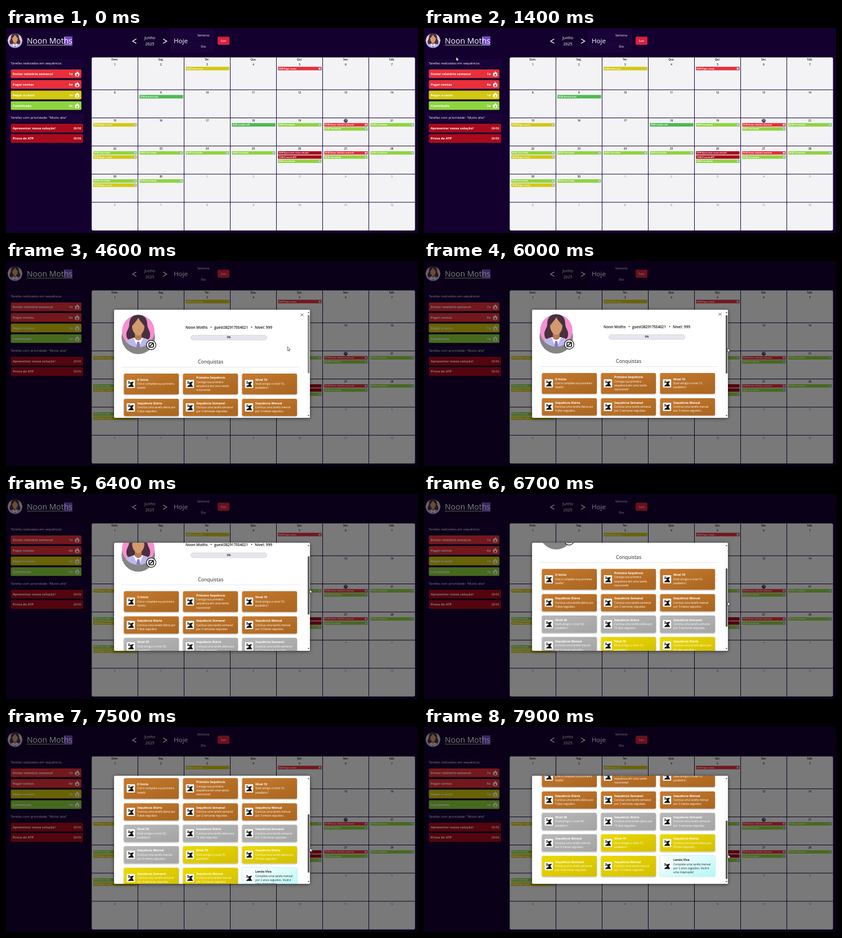
Write an HTML page that moves like this. It is 732 px wide and 366 px high and loops after 8000 ms.

```html
<!DOCTYPE html>
<html lang="pt">
<head>
<meta charset="utf-8">
<title>Calendário de tarefas</title>
<style>
html, body { margin: 0; width: 100%; height: 100%; overflow: hidden; background: #14002f; }
svg {
  display: block; width: 732px; height: 366px; font-family: "Open Sans", "Noto Sans", sans-serif;
  --bg: #14002f; --panel: #190338; --cell: #f3f3f6; --line: #17053a; --ink: #111; --pale: #8b8b93;
  --white: #fff; --red: #e8303a; --dark: #a90b1c; --yellow: #d2c811; --green: #8fd43f; --leaf: #4cbb50;
  --exit: #d8203f; --icon: #9db8e4; --mark: #7446c8;
}
</style>
</head>
<body>
<svg id="stage" viewBox="0 0 732 366">
  <defs>
    <linearGradient id="bronze" x2="1" y2="1"><stop stop-color="#c67a30"/><stop offset="1" stop-color="#a9651f"/></linearGradient>
    <linearGradient id="silver" x2="1" y2="1"><stop stop-color="#b8b8b8"/><stop offset="1" stop-color="#a4a4a4"/></linearGradient>
    <linearGradient id="gold" x2="1" y2="1"><stop stop-color="#ecd900"/><stop offset="1" stop-color="#d3bf00"/></linearGradient>
    <linearGradient id="legend" x2="1" y2="1"><stop stop-color="#fff"/><stop offset="1" stop-color="#b5f6f6"/></linearGradient>
    <filter id="soft" x="-10%" y="-20%" width="120%" height="150%"><feDropShadow dx="0" dy="1" stdDeviation="1" flood-opacity=".35"/></filter>
    <filter id="deep" x="-10%" y="-10%" width="120%" height="120%"><feDropShadow dx="0" dy="1" stdDeviation="3" flood-opacity=".6"/></filter>
    <filter id="glow" x="-10%" y="-20%" width="120%" height="150%"><feDropShadow dx="0" dy="0" stdDeviation="1.6" flood-color="#5ee0e0" flood-opacity=".8"/></filter>
    <clipPath id="window"><rect x="192" y="87" width="348" height="193" rx="2.500"/></clipPath>
    <clipPath id="round"><circle r="29"/></clipPath>
  </defs>
  <g id="page"></g>
  <g id="modal">
    <rect width="732" height="366" opacity=".5"/>
    <rect x="192" y="87" width="348" height="193" rx="2.500" fill="#fff" filter="url(#deep)"/>
    <g clip-path="url(#window)">
      <g id="content"></g>
      <rect x="535" y="87" width="5" height="193" fill="#fafafa"/>
      <path d="M535.800 93l1.700-2.200 1.700 2.200zM535.800 275l1.700 2.200 1.700-2.200z" fill="#555"/>
      <rect id="thumb" x="536" width="3.200" height="104.500" rx="1.600"/>
    </g>
  </g>
  <path id="cursor" d="M0 0v7l1.600-1.400 1.100 2.400 1.100-.5-1.100-2.300h2.300z" fill="#fff" stroke="#111" stroke-width=".6"/>
</svg>
<script>
const $ = id => document.getElementById(id);
const ink = c => c !== 'none' && /^[a-z]+$/.test(c) ? `var(--${c})` : c;

const rect = (x, y, w, h, fill, r = 0, extra = '') =>
  `<rect x="${x}" y="${y}" width="${w}" height="${h}" rx="${r}" fill="${ink(fill)}" ${extra}/>`;
const circle = (x, y, r, fill, extra = '') =>
  `<circle cx="${x}" cy="${y}" r="${r}" fill="${ink(fill)}" ${extra}/>`;
const path = (d, fill, extra = '') => `<path d="${d}" fill="${ink(fill)}" ${extra}/>`;
const stroke = (d, color, width) => path(d, 'none', `stroke="${ink(color)}" stroke-width="${width}"`);
// y is the middle of the line
const text = (x, y, s, size, fill = 'white', weight = 400, anchor = 'start') =>
  `<text x="${x}" y="${y + size * .36}" font-size="${size}" font-weight="${weight}" text-anchor="${anchor}" fill="${ink(fill)}">${s}</text>`;
const mid = (x, y, s, size, fill, weight) => text(x, y, s, size, fill, weight, 'middle');

const BRAND = 'Noon Moths', USER = 'guest382917554021';

// Portrait in a circle of radius 29
function portrait(x, y, scale, backdrop) {
  return `<g transform="translate(${x} ${y}) scale(${scale})" clip-path="url(#round)">` +
    circle(0, 0, 29, backdrop) +
    path('M0-29C11-29 16-22 16-12 16-4 22 0 21 8 21 14 16 17 11 17H-11C-16 17-21 14-21 8-22 0-16-4-16-12-16-22-11-29 0-29z', '#48303f') +
    path('M-27 31C-27 19-20 15-8 12H8C20 15 27 19 27 31z', '#bdb6ea') +
    path('M-9 12L0 31 9 12z', '#fff') +
    path('M-2 19h4l1.500 12h-7z', '#7d79c4') +
    path('M-6 2H6V13C3 18-3 18-6 13z', '#b87a50') +
    path('M-11-9C-11-19-7-23 0-23S11-19 11-9C11 1 5 8 0 8S-11 1-11-9z', '#d39a70') +
    path('M0-24C-3-17-8-14-12-7L-13-17C-10-27 10-27 13-17L12-7C8-14 3-17 0-24z', '#48303f') + '</g>';
}

function header() {
  return portrait(16, 22.5, .45, '#d9c3da') +
    rect(103, 15, 15, 15, 'mark') +
    text(37, 22.5, BRAND, 14) +
    rect(37, 30, 81, .7, 'white') +
    rect(291, 2, 40, 42, 'panel') + rect(331, 2, 39, 20.5, 'panel') + rect(331, 23.5, 39, 20.5, 'panel') +
    stroke('M231.500 19.500l-6.500 4 6.500 4M279 19.500l6.500 4-6.500 4', 'white', 1.4) +
    mid(255.5, 17, 'Junho', 7) + mid(255.5, 28.5, '2025', 7) +
    mid(310.5, 23, 'Hoje', 11.6) + mid(350.5, 12.5, 'Semana', 5.6) + mid(350.5, 33, 'Dia', 5.6) +
    rect(376, 15.5, 21, 14.5, 'exit', 2) + mid(386.5, 22.7, 'Sair', 6);
}

function flame(x, y, hole) {
  return `<g transform="translate(${x} ${y})">` +
    path('M-.5-4.800C2.500-2.500 4-.8 4 1.300A4 3.500 0 0 1-4 1.300C-4-.5-3-1.200-2.500-2.600-1.800-2-1.300-1.800-1-1.600-.5-2.500-.4-3.500-.5-4.800z', 'white') +
    path('M.2-.5C1.300.5 1.800 1.200 1.800 2.200A1.800 1.700 0 0 1-1.800 2.200C-1.800 1-.3.8.2-.5z', hole) + '</g>';
}

function sidebar() {
  const streaks = [['Enviar relatório semanal', 1, 'red'], ['Pagar contas', 6, 'red'],
    ['Regar o cacto', 1, 'yellow'], ['Caminhada', 3, 'green']];
  const urgent = ['Apresentar nossa solução!', 'Prova de ATP'];
  return rect(5, 55.5, 134, 14.5, 'panel') + rect(5, 152.5, 134, 14.5, 'panel') +
    text(8.5, 62.5, 'Tarefas realizadas em sequência:', 5.95) +
    text(8.5, 160, 'Tarefas com prioridade: "Muito alta"', 5.95) +
    streaks.map(([name, n, color], i) => {
      const y = 81.8 + i * 18.9;
      return rect(8.5, y - 7.8, 125.5, 15.6, color, 2) + text(12, y, name, 5.8, 'white', 700) +
        text(118.5, y, n + 'x', 5.8, 'white', 700, 'end') + flame(126.5, y, color);
    }).join('') +
    urgent.map((name, i) => {
      const y = 178.7 + i * 18.6;
      return rect(8.5, y - 7.8, 128.5, 15.6, 'dark', 2) + text(12, y, name, 5.8, 'white', 700) +
        text(133.5, y, '26/06', 5.2, 'white', 600, 'end');
    }).join('');
}

const walk = ['green', '08:00 Caminhada', 1];
const water = ['yellow', '10:00 Regar o cacto', 1];
const report = ['red', '09:00 Enviar relatório semanal', 1];
const events = {
  3: [['yellow', '03:00 Comer ovos']], 5: [['red', '00:00 Pagar contas', 1]],
  9: [['leaf', '10:00 dentista hoje!']], 15: [water], 18: [['leaf', '10:00 reunião café']],
  19: [walk], 20: [report, walk], 21: [walk], 22: [walk, water], 23: [walk], 24: [walk], 25: [walk],
  26: [['dark', '02:00 Apresentar nossa solução!'], ['dark', '19:00 Prova de ATP'], walk],
  27: [report, walk], 28: [walk], 29: [walk, water], 30: [walk]
};

function calendar() {
  const x0 = 152.3, cw = 82.05, rh = 50.2;
  let out = rect(x0, 52.5, 574.4, 309, 'cell', 2.5);
  for (let c = 1; c < 7; c++) out += rect(x0 + c * cw - .5, 52.5, 1, 309, 'line');
  for (let r = 0; r < 5; r++) out += rect(x0, 109.8 + r * rh, 574.4, 1, 'line');
  ['Dom.', 'Seg.', 'Ter.', 'Qua.', 'Qui.', 'Sex.', 'Sáb.'].forEach((d, c) =>
    out += mid(x0 + (c + .5) * cw, 56.3, d, 4.7, 'ink', 600));
  for (let i = 0; i < 42; i++) {
    const day = i + 1, x = x0 + (i % 7) * cw, cx = x + cw / 2, y = 65 + Math.floor(i / 7) * rh;
    if (day === 20) out += circle(cx, y + .2, 3.3, 'line');
    out += mid(cx, y, day > 30 ? day - 30 : day, 4.6, day > 30 ? 'pale' : day === 20 ? 'white' : 'ink', 600);
    (events[day] || []).forEach(([color, label, repeats], k) => {
      const ey = y + 7.4 + k * 7.4;
      out += rect(x + 2.7, ey - 3.1, 77.5, 6.2, color, .8) + text(x + 4, ey, label, 3.4, 'white', 700);
      if (repeats) out += rect(x + 74.8, ey - 2, 4, 4, 'icon', .6) + rect(x + 76, ey - .8, 1.6, 1.6, 'white');
    });
  }
  return out;
}

function profile() {
  const edit = circle(258, 150, 8.4, '#fff', 'stroke="#111" stroke-width="1.200"') +
    rect(254, 146, 8, 8, 'none', 1.5, 'stroke="#111" stroke-width="1.700"') +
    stroke('M255.500 152.500l6-6', 'ink', 1.7);
  return circle(235, 136.5, 29.7, '#858585') + portrait(235, 125, 1, '#f78fd0') + edit +
    stroke('M523.500 93.500l5 5M528.500 93.500l-5 5', '#444', .8) +
    text(319, 118.3, BRAND, 6.6, 'ink', 600) + mid(364.5, 118.3, '•', 6.6, 'ink', 600) +
    text(370, 118.3, USER, 6.3, 'ink', 600) + mid(436.5, 118.3, '•', 6.6, 'ink', 600) +
    text(442, 118.3, 'Nível: 999', 6.6, 'ink', 600) +
    rect(328.5, 132.5, 135, 8.6, '#e6e6ee', 4.3, 'stroke="#c6c6ce" stroke-width=".6"') +
    mid(396, 136.6, '0%', 4.8, 'ink', 600) +
    mid(363.5, 180, 'Conquistas', 8.7, '#222') +
    rect(205, 189.2, 317, .7, '#dcdcdc');
}

const level = n => ['Nível ' + n, `Você atingiu o nível ${n},|parabéns!`];
const daily = n => ['Sequência Diária', `Conclua uma tarefa diária por|${n} dias seguidos.`];
const weekly = n => ['Sequência Semanal', `Conclua uma tarefa semanal|por ${n} semanas seguidas.`];
const monthly = n => ['Sequência Mensal', `Conclua uma tarefa mensal|por ${n} meses seguidos.`];
const awards = [
  ['O Início', 'Crie e complete sua primeira|tarefa!'],
  ['Primeira Sequência', 'Consiga sua primeira|sequência em uma tarefa|recorrente!'],
  level(10), daily(5), weekly(2), monthly(3),
  level(30), daily(15), weekly(3), monthly(6),
  level(70), daily(30), weekly(4), monthly(12),
  ['Lenda Viva', 'Complete uma tarefa mensal|por 2 anos seguidos. Você é|uma inspiração!']
];
const rows = [[201, 37], [246, 30.7], [284.3, 30.7], [322.6, 30.7], [361, 36.7]];

function award([title, body], i) {
  const x = 209.5 + (i % 3) * 105, [y, h] = rows[Math.floor(i / 3)], cy = y + h / 2;
  const metal = i < 6 ? 'bronze' : i < 10 ? 'silver' : i < 14 ? 'gold' : 'legend';
  const last = metal === 'legend', color = last ? '#222' : '#fff';
  const lines = [title, ...body.split('|')];
  return rect(x, y, 97.5, h, `url(#${metal})`, 2.5, `filter="url(#${last ? 'glow' : 'soft'})"`) +
    rect(x + 5, cy - 7.3, 14.6, 14.6, '#fff', 1) +
    `<g transform="translate(${x + 5} ${cy - 7.3})">` +
    path('M2 12.500l2-2.500 3-1.500-1-2.500-3.500.5v-1.500l5-.7 4.500-1.300v2l-2 2 1.500 3 1.500 2.500zM2.500 2.500h3v1.200h-3z', 'ink') + '</g>' +
    lines.map((s, k) => text(x + 23.5, cy + (k - (lines.length - 1) / 2) * 7.2 - (k ? 0 : .4), s,
      k ? 4.9 : 5.3, color, k ? 400 : 700)).join('');
}

$('page').innerHTML = rect(0, 0, 732, 366, 'bg') + header() + sidebar() + calendar();
$('content').innerHTML = profile() + awards.map(award).join('');

// Keys are [time, ...values], joined by straight lines
function at(keys, t) {
  const i = keys.findIndex(k => k[0] > t);
  if (i < 0) return keys.at(-1).slice(1);
  if (i === 0) return keys[0].slice(1);
  const a = keys[i - 1], b = keys[i], p = (t - a[0]) / (b[0] - a[0]);
  return a.slice(1).map((v, k) => v + (b[k + 1] - v) * p);
}

const pointer = [[100, 317, 352], [900, 150, 130], [1600, 20, 20.5], [3300, 20, 20.5], [3900, 413, 132],
  [4500, 413, 132], [4600, 500, 153], [4900, 531, 159], [5500, 531, 159], [5600, 539, 155], [7200, 540, 155]];
const scrolling = [[5800, 0], [6000, 1], [6200, 1], [6700, 67.3], [7100, 91], [7200, 94], [7900, 131]];

function draw() {
  const t = Math.floor(performance.now() % 8000 / 100) * 100;
  const [scroll] = at(scrolling, t), [x, y] = at(pointer, t);
  $('modal').style.display = t < 2300 ? 'none' : '';
  $('content').setAttribute('transform', `translate(0 ${-scroll})`);
  $('thumb').setAttribute('y', 96 + scroll * .542);
  $('thumb').setAttribute('fill', t < 5600 ? '#8c8c8c' : '#5a5a5a');
  $('cursor').style.display = t < 100 ? 'none' : '';
  $('cursor').setAttribute('transform', `translate(${x} ${y + scroll / 1.8})`);
  requestAnimationFrame(draw);
}
draw();
</script>
</body>
</html>
```
